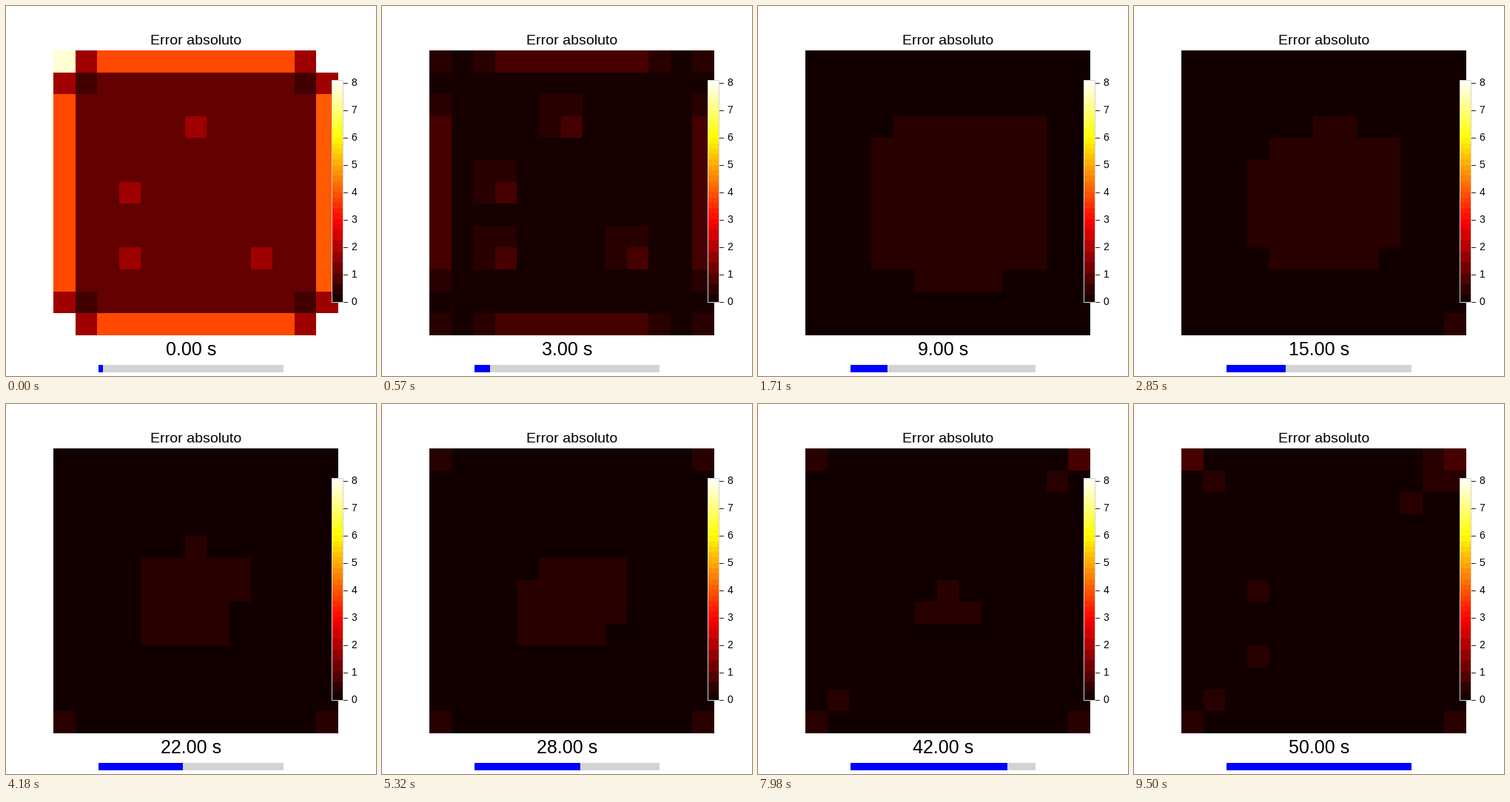
A matplotlib script for the animation above (9690 ms loop, 500 by 500 pixels).

```python
import numpy as np
import matplotlib.pyplot as plt
from matplotlib.animation import FuncAnimation
from matplotlib.patches import Rectangle

FRAMES, INTERVAL = 51, 190
N = 13
PX = 0.72  # one pixel in points at 100 dpi
VMAX = 8.1
MID, HIGH = 0.36, 0.73
SOURCES = [(3, 6), (6, 3), (9, 3), (9, 9)]
# corner row, column, start time and growth rate of the returning error
CORNERS = [(0, 0, 28, 0.07), (0, 12, 26, 0.1),
           (12, 0, 16, 0.044), (12, 12, 11, 0.01)]

plt.rcParams["font.family"] = "Liberation Sans"

ROW, COL = np.indices((N, N))
P, Q = np.minimum(ROW, N - 1 - ROW), np.minimum(COL, N - 1 - COL)
EDGE = P * Q == 0


def hot(v):
    """Black-red-yellow-white colours for error values."""
    x = np.clip(np.asarray(v, float) / VMAX, 0, 1)
    r = 0.0416 + 0.9584 * x / 0.365
    g = (x - 0.365) / 0.381
    b = (x - 0.746) / 0.254
    return np.clip(np.stack([r, g, b], axis=-1), 0, 1)


def initial():
    v = np.select([P + Q == 0, P + Q == 1, EDGE, P * Q == 1],
                  [VMAX, 1.8, 3.83 + 0.22 * (COL == N - 1), 0.68], 1.08)
    v[0, 0] = 7.75
    for src in SOURCES:
        v[src] = 1.8
    return v


def residue():
    """Levels left on the border and around the sources after the drop."""
    along = np.maximum(P, Q)
    out = EDGE * np.select([along > 2, along != 1], [2, 1])
    for r, c in SOURCES:
        out[r - 1:r + 1, c - 1:c + 1] = 1
        out[r, c] = 2
    return out


def blob(n):
    """Central patch that swells, then drifts and shrinks."""
    t = [4, 9, 22, 35, 42, 48]
    row = np.interp(n, t, [6.1, 6.1, 6.4, 6.6, 6.8, 6.9])
    col = np.interp(n, t, [6.6, 6.6, 5.7, 6.2, 6, 6])
    radius = np.interp(n, t, [0, 4.02, 2.45, 2.14, 1.1, 0])
    power = np.interp(n, t[1:3], [4, 2])
    dr, dc = ROW - row, COL - col
    dist = abs(dr) ** power + abs(dc) ** power + 0.4 * dr * dc
    return dist < radius ** power


def corners(n):
    """Error creeping in from the corners, diagonal first."""
    out = np.zeros((N, N))
    for r, c, start, rate in CORNERS:
        reach = rate * (n - start)
        dr, dc = abs(ROW - r), abs(COL - c)
        dist = np.maximum(dr, dc) + abs(dr - dc)
        out = np.maximum(out, 1.0 * (dist <= reach) + (dist <= reach - 1.5))
    return out


START, RESIDUE = initial(), residue()


def shade(levels, n):
    base = np.interp(n, [3, 9], [0.14, 0.09])
    return np.array([base, MID, HIGH])[levels.astype(int)]


def values(n):
    if n <= 3:
        u = n / 3
        return START ** (1 - u) * shade(RESIDUE, 3) ** u
    fading = np.rint(RESIDUE * max(0, 1 - (n - 3) / 5))
    levels = np.maximum(np.maximum(fading, blob(n)), corners(n))
    if n > 46:  # the left sources show again
        for src in SOURCES[1:3]:
            levels[src] = 1
    return shade(levels, n)


fig = plt.figure(figsize=(5, 5), dpi=100, facecolor="white")
ax = fig.add_axes([0, 0, 1, 1])


def box(x, y, w, h, color):
    return ax.add_patch(Rectangle((x, y), w, h, facecolor=color, lw=0,
                                  antialiased=False, zorder=3))


image = ax.imshow(hot(START), extent=(64, 449, 445, 60), aspect="auto",
                  interpolation="nearest", zorder=1)
ax.set_xlim(0, 500)
ax.set_ylim(500, 0)
ax.axis("off")

# colour scale: coarse steps in the dark part, fine ones above
edges = np.r_[0, 10 + 14.6 * np.arange(7), np.arange(105, 300, 7.3), 300]
for lo, hi in zip(edges[:-1], edges[1:]):
    box(440, 400 - hi, 15, hi - lo, hot((lo + hi) / 2 / 37))
ax.add_patch(Rectangle((440.5, 100.5), 15, 300, fill=False, ec="lightgray",
                       lw=PX, zorder=4, snap=False))
for i in range(9):
    y = 400.5 - 37 * i
    ax.plot([456, 462], [y, y], color="#222222", lw=PX, zorder=4,
            solid_capstyle="butt", snap=False)
    ax.text(466.5, y + 3.4, str(i), size=10, va="baseline")

ax.text(256.2, 52, "Error absoluto", size=14, ha="center", va="baseline")
clock = ax.text(250, 472, "", size=18, ha="center", va="baseline")
box(125, 485, 250, 10, "lightgray")
bar = box(125, 485, 6, 10, "blue")


def update(n):
    image.set_data(hot(values(n)))
    clock.set_text(f"{n:.2f} s")
    bar.set_width(min(250, 6.2 + 4.89 * n))
    return image, clock, bar


anim = FuncAnimation(fig, update, frames=FRAMES, interval=INTERVAL,
                     repeat=True, repeat_delay=0)
plt.show()
```
